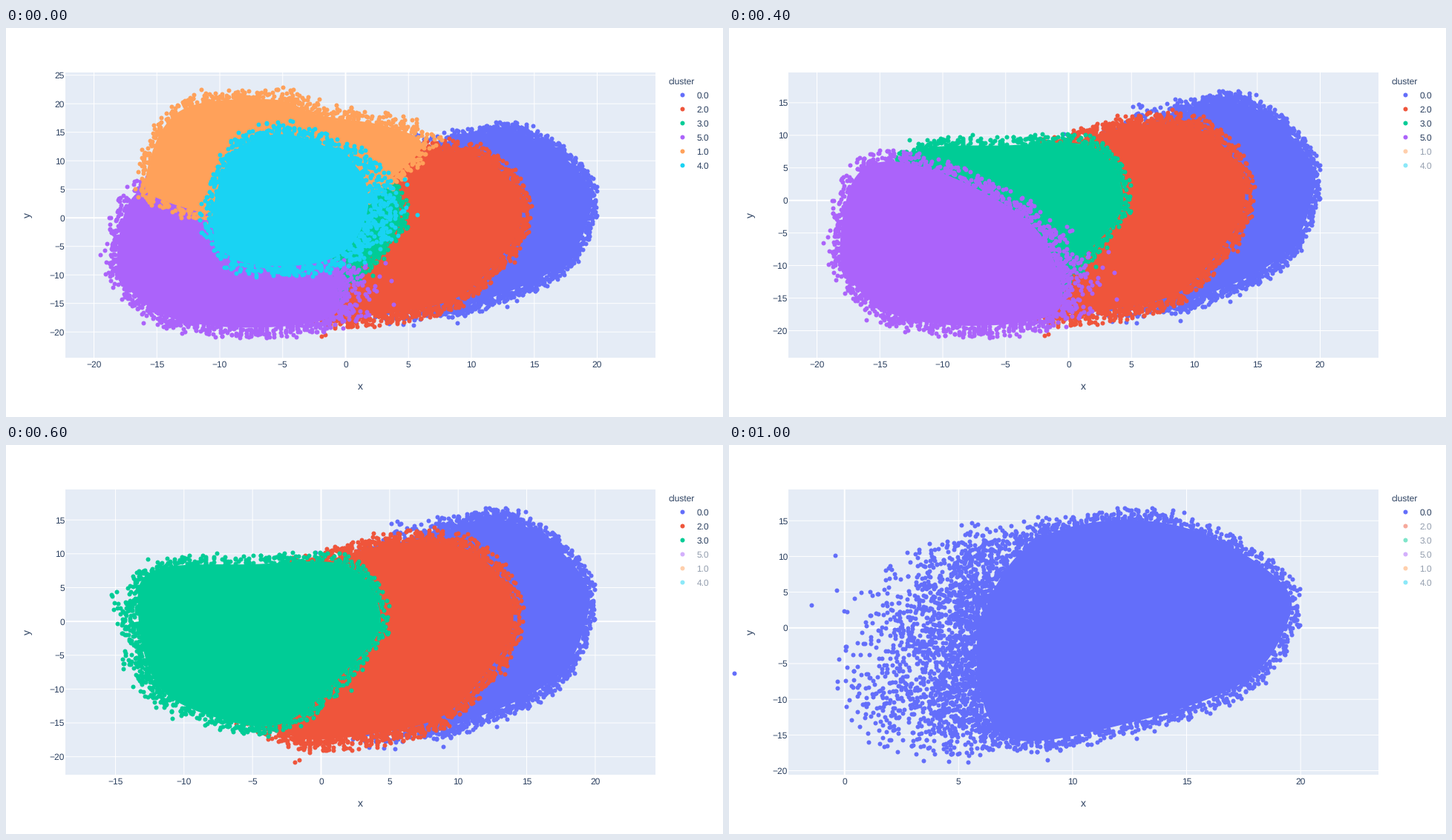
Write a matplotlib script that moves like this. It is 966 px wide and 525 px high and loops after 1200 ms.

```python
import numpy as np
import matplotlib.pyplot as plt
from matplotlib.animation import FuncAnimation

W, H, DPI = 966, 525, 100
PX = 72 / DPI
LEFT, TOP, RIGHT, BOTTOM = 80, 60, 875, 445
INK = "#2a3f5f"
DOT = (6 * PX) ** 2
DENSITY = 0.045  # fringe dots per square pixel

plt.rcParams.update({"font.family": "Liberation Sans", "text.hinting": "none"})
rng = np.random.default_rng(7)

# Axis view per step: x origin, x scale, y origin, y scale (pixels per unit)
FULL = (457.5, 16.95, 256.2, 7.7)
VIEWS = [
    FULL,
    FULL,
    (457.5, 16.95, 232.7, 8.79),
    (424.5, 18.47, 238.1, 9.13),
    (311.4, 23.61, 238.1, 9.13),
    (155.7, 30.72, 246.8, 9.64),
]


def to_pixels(points, view):
    x0, sx, y0, sy = view
    return points * (sx, -sy) + (x0, y0)


def to_data(pixels, view):
    x0, sx, y0, sy = view
    return (pixels - (x0, y0)) / (sx, -sy)


def smooth_loop(knots, steps=40):
    """Closed Catmull-Rom curve through the knots."""
    a, b, c, d = (np.roll(knots, k, axis=0)[:, None] for k in (1, 0, -1, -2))
    t = np.linspace(0, 1, steps, endpoint=False)[None, :, None]
    cubic = 2 * a - 5 * b + 4 * c - d + t * (3 * (b - c) + d - a)
    return (b + 0.5 * t * (c - a + t * cubic)).reshape(-1, 2)


def make_cluster(label, color, step, spread, tail, heading, knots):
    """Dense core with dots thinning out around it, furthest along heading.

    Knots run clockwise, in pixels of the view where the cluster is on top.
    """
    core = smooth_loop(np.array(knots, float))
    tangent = np.roll(core, -1, axis=0) - np.roll(core, 1, axis=0)
    length = np.hypot(*tangent.T)
    normal = np.column_stack([tangent[:, 1], -tangent[:, 0]]) / length[:, None]
    angle = np.radians(heading)
    facing = (normal @ (np.cos(angle), -np.sin(angle))).clip(0)
    width = spread + tail * facing ** 4

    area = width * length / 2
    count = int(area.sum() * DENSITY)
    pick = rng.choice(len(core), count, p=area / area.sum())
    reach = rng.beta(1, 2.2, count) * width[pick]
    reach[rng.random(count) < 0.015] *= 1.8  # a few strays
    dots = core[pick] + normal[pick] * reach[:, None]
    view = VIEWS[step]
    return label, color, to_data(core, view), to_data(dots, view)


CLUSTERS = [
    make_cluster("0.0", "#636efa", 5, 20, 190, 180, [
        (334, 300), (352, 205), (415, 128), (530, 101), (645, 122),
        (748, 190), (748, 250), (690, 322), (540, 375), (378, 396)]),
    make_cluster("2.0", "#ef553b", 4, 21, 55, 180, [
        (204, 270), (222, 190), (330, 154), (450, 132), (560, 140),
        (630, 190), (640, 250), (598, 305), (520, 366), (400, 390),
        (270, 395), (208, 350)]),
    make_cluster("3.0", "#00cc96", 3, 16, 22, 190, [
        (178, 225), (200, 169), (330, 161), (462, 164), (505, 240),
        (455, 308), (375, 375), (290, 370), (205, 325)]),
    make_cluster("5.0", "#ab63fa", 2, 20, 38, 0, [
        (150, 285), (168, 205), (215, 180), (300, 201), (400, 258),
        (440, 320), (440, 384), (330, 402), (220, 386), (160, 335)]),
    make_cluster("1.0", "#ffa15a", 1, 15, 25, 30, [
        (188, 205), (212, 135), (260, 102), (365, 97), (420, 117),
        (515, 133), (560, 160), (500, 216), (420, 253), (310, 258),
        (205, 230)]),
    make_cluster("4.0", "#19d3f3", 0, 21, 38, 0, [
        (278, 265), (300, 178), (345, 147), (400, 148), (470, 185),
        (488, 240), (460, 298), (400, 320), (310, 313)]),
]

fig = plt.figure(figsize=(W / DPI, H / DPI), dpi=DPI, facecolor="white")
ax = fig.add_axes([0, 0, 1, 1])


def write(x, y, text, size=12, **style):
    ax.text(x, y, text, fontsize=size * PX, color=INK, va="baseline", **style)


def draw_dots(points, color, **style):
    ax.scatter(*points.T, s=DOT, color=color, lw=0, snap=False, **style)


def draw_axes(view):
    ax.add_patch(plt.Rectangle((LEFT, TOP), RIGHT - LEFT, BOTTOM - TOP,
                               color="#e5ecf6", lw=0, zorder=0))
    for value in range(-25, 30, 5):
        x, y = to_pixels(np.array([value, value]), view)
        label = str(value).replace("-", "\u2212")
        line = dict(color="white", lw=(1 if value else 2) * PX, zorder=1,
                    snap=False, solid_capstyle="butt")
        if LEFT < x < RIGHT:
            ax.plot([x, x], [TOP, BOTTOM], **line)
            write(x, 458, label, ha="center")
        if TOP < y < BOTTOM:
            ax.plot([LEFT, RIGHT], [y, y], **line)
            write(79, y + 4.3, label, ha="right")
    write(477.5, 487.5, "x", 14, ha="center")
    write(33.5, 252.5, "y", 14, ha="center", rotation=90,
          rotation_mode="anchor")


def draw_legend(shown):
    write(892.4, 76, "cluster")
    for i, (label, color, _, _) in enumerate(CLUSTERS):
        y = 90.3 + 19 * i
        alpha = 1 if i < shown else 0.5
        draw_dots(np.array([[910.9, y]]), color, alpha=alpha)
        write(930.4, y + 4.5, label, alpha=alpha)


def draw(step):
    ax.clear()
    ax.set_axis_off()
    ax.set(xlim=(0, W), ylim=(H, 0))
    view = VIEWS[step]
    shown = len(CLUSTERS) - step
    draw_axes(view)
    for z, (_, color, core, dots) in enumerate(CLUSTERS[:shown], start=2):
        ax.fill(*to_pixels(core, view).T, color=color, lw=0, zorder=z)
        draw_dots(to_pixels(dots, view), color, zorder=z)
    draw_legend(shown)


anim = FuncAnimation(fig, draw, frames=len(VIEWS), interval=200, repeat=True)
plt.show()
```
